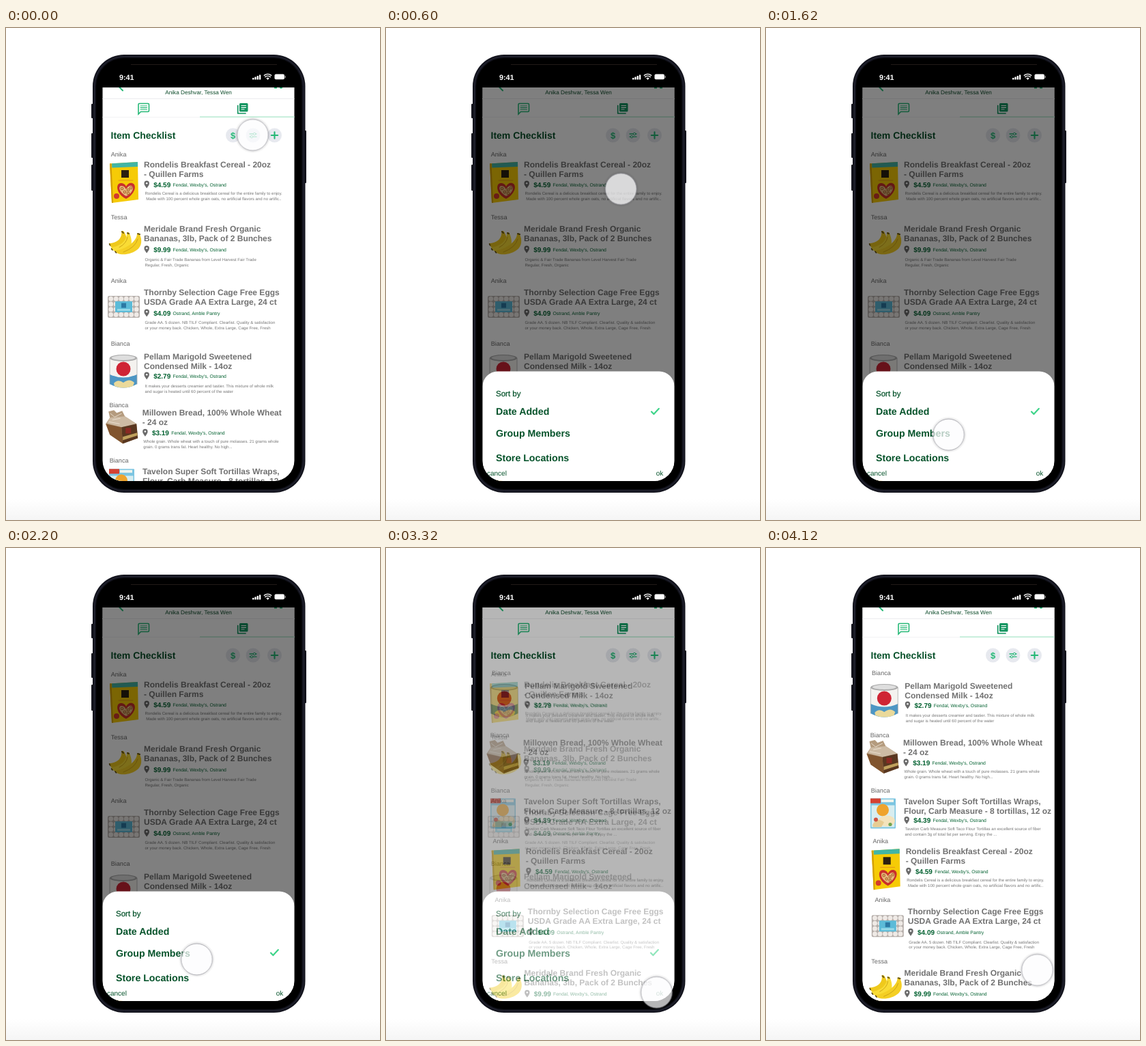
Animation, 548 px wide and 720 px high, one loop 4.14 s. Source, as an HTML page:

```html
<!DOCTYPE html>
<html lang="en">
<head>
<meta charset="utf-8">
<title>Item checklist sorting</title>
<style>
  html, body { margin: 0; width: 100%; height: 100%; overflow: hidden; background: #fff; }
  svg { display: block; width: 548px; height: 720px; }
  text { font-family: "Liberation Sans", Arial, sans-serif; text-rendering: geometricPrecision; white-space: pre; }
  .label { font-size: 9.1px; fill: #666; }
  .title { font-size: 12px; font-weight: 700; fill: #717171; }
  .price { font-size: 10px; font-weight: 700; fill: #00602f; }
  .shops { font-size: 6.85px; fill: #00602f; }
  .note { font-size: 6.05px; fill: #777; }
  .option { font-size: 14.2px; font-weight: 700; fill: #06532b; }
  .small { font-size: 10px; fill: #06532b; }
</style>
</head>
<body>
<svg id="stage" viewBox="0 0 548 720" xmlns="http://www.w3.org/2000/svg"></svg>
<script>
const LOOP = 4140;
const GREEN = '#25b876';

const rect = (x, y, w, h, fill, r = 0, more = '') =>
  `<rect x="${x}" y="${y}" width="${w}" height="${h}" rx="${r}" fill="${fill}" ${more}/>`;
const dot = (x, y, r, fill, more = '') => `<circle cx="${x}" cy="${y}" r="${r}" fill="${fill}" ${more}/>`;
const oval = (x, y, rx, ry, fill) => `<ellipse cx="${x}" cy="${y}" rx="${rx}" ry="${ry}" fill="${fill}"/>`;
const path = (d, fill, more = '') => `<path d="${d}" fill="${fill}" ${more}/>`;
const line = (d, color, width) =>
  path(d, 'none', `stroke="${color}" stroke-width="${width}" stroke-linecap="round" stroke-linejoin="round"`);
const text = (x, y, kind, words, more = '') =>
  `<text x="${x}" y="${y}" class="${kind}" ${more}>${words.replace(/&/g, '&amp;')}</text>`;
const group = (x, y, body) => `<g transform="translate(${x} ${y})">${body}</g>`;

// Pack pictures, drawn from their top left corner
const packs = {
  cereal: () =>
    path('M0 2.5 L41 0 L42 55 L3 60 Z', '#f6cb06') +
    path('M0 2.5 L2.5 2.3 L5 59.7 L3 60 Z', '#d39f00') +
    path('M3 2.3 L41 0 L41.1 7 L3.3 8.5 Z', '#42b5a5') +
    rect(17, 12, 11, 11, '#2a2010') +
    line('M13 27 H34', '#e5931b', 1) +
    path('M24 54 C8 46 9 31 16 31 C20 31 23 33 24 36 C26 32 29 30 33 31 C41 34 36 48 24 54 Z', '#c9302b') +
    path('M24 50 C12 43 13 35 17 35 C21 35 23 38 24 40 C26 36 29 34 32 35 C37 38 32 47 24 50 Z', '#e6b77d') +
    [[18, 39], [22, 44], [27, 41], [31, 38], [27, 46]].map(p =>
      dot(...p, 1.7, 'none', 'stroke="#a9682c" stroke-width="1.1"')).join('') +
    dot(10, 50, 4, '#d33a2c'),
  bananas: () =>
    path('M19 0 C21 11 12 18 1 18 C2 26 14 29 25 22 C29 17 27 6 22 0 Z', '#efc91c') +
    path('M27 2 C28 14 17 23 4 24 C7 33 22 33 32 23 C36 17 33 7 30 2 Z', '#f9dc35') +
    path('M42 4 C42 15 26 27 9 29 C12 36 32 37 44 26 C51 18 48 9 45 3 Z', '#f4cf24') +
    line('M28 9 Q27 18 16 24 M43 12 Q40 24 22 31', '#c99f16', .9) +
    line('M20 1 L22 3 M28 3 L30 4 M43 4 L46 5', '#6d5a16', 2) +
    line('M1.5 19 L2.5 21 M4.5 26 L6 28 M10 30 L11.5 32', '#55430f', 1.5),
  eggs: () => {
    let body = rect(0, 1, 47, 32, '#b5aeaa', 2);
    for (let i = 0; i < 24; i++)
      body += oval(4.7 + i % 6 * 7.5, 5.3 + (i / 6 | 0) * 7.7, 3.4, 3.5, '#efeae6');
    return body + rect(11, 9, 25, 16, '#5cbbd8') + rect(14, 20, 19, 3, '#97d9e8') + rect(20, 11.5, 7, 7, '#2c79a4');
  },
  milk: () =>
    path('M0 5 V43 Q20 54 40 43 V5 Z', '#f4f2ef') +
    path('M0 29 Q20 38 40 29 V43 Q20 54 0 43 Z', '#4d96c4') +
    path('M6 42 Q12 35 20 41 Q29 34 36 41 L34 46 Q20 51 7 46 Z', '#ead99a') +
    line('M0 5 V43 M40 5 V43', '#aaa', .8) +
    oval(20, 5, 20, 5, '#aaa') + oval(20, 4.6, 17.5, 3.5, '#dedede') +
    dot(20, 21, 10.5, '#cf2434'),
  bread: () =>
    path('M4 2 L12 0 L16 4 L24 1 L28 9 L45 20 L47 41 L25 49 L6 36 L0 20 L6 11 Z', '#b49b7e') +
    path('M6 11 L28 9 L45 20 L23 25 L2 19 Z', '#cdbba4') +
    path('M0 20 L23 25 L25 49 L6 36 Z', '#81552f') +
    path('M23 25 L45 20 L47 41 L25 49 Z', '#593720') +
    path('M25 39 L46 33 L46.5 37 L25 44 Z', '#c0a15d') +
    rect(29, 26, 8, 8, '#8a2a23') +
    line('M7 5 L13 10 L23 5 M10 14 L21 12 M5 17 L20 20', '#eee3d3', .9),
  wraps: () =>
    rect(0, 0, 37, 44, '#7cc5e1', 1) + rect(1.5, 10, 34, 32, '#d8edf0') +
    rect(0, 0, 15, 7, '#d44132') + rect(16, 1.5, 18, 4, '#f0f4ed') +
    dot(18, 17, 9, '#efa32c') +
    oval(24, 33, 12, 8, '#f3e3bc') +
    path('M3 39 Q9 26 20 35 L16 42 H4 Z', '#e7cd93') +
    dot(8, 31, 3, '#cf5342') + dot(29, 38, 2.6, '#71a34f')
};

const FULL = "Fendal, Wexby's, Ostrand";
// up: label rise, pic: picture offset, drop: price below title, low: note below title
const goods = {
  cereal: { who: 'Anika', up: 15, pic: [-50, -8], drop: 29, low: 42,
    title: ['Rondelis Breakfast Cereal - 20oz', '- Quillen Farms'], price: '$4.59', shops: FULL,
    note: ['Rondelis Cereal is a delicious breakfast cereal for the entire family to enjoy.',
      ' Made with 100 percent whole grain oats, no artificial flavors and no artific..'] },
  bananas: { who: 'Tessa', up: 17.5, pic: [-52, -1], drop: 30, low: 45,
    title: ['Meridale Brand Fresh Organic', 'Bananas, 3lb, Pack of 2 Bunches'], price: '$9.99', shops: FULL,
    note: ['Organic & Fair Trade Bananas from Level Harvest Fair Trade', 'Regular, Fresh, Organic'] },
  eggs: { who: 'Anika', up: 17.2, pic: [-53, 0], drop: 30, low: 44.5,
    title: ['Thornby Selection Cage Free Eggs', 'USDA Grade AA Extra Large, 24 ct'], price: '$4.09', shops: 'Ostrand, Amble Pantry',
    note: ['Grade AA. 5 dozen. NB TILF Compliant. Clearlist. Quality & satisfaction',
      'or your money back. Chicken, Whole, Extra Large, Cage Free, Fresh'] },
  milk: { who: 'Bianca', up: 18.8, pic: [-50, -7], drop: 28, low: 43,
    title: ['Pellam Marigold Sweetened', 'Condensed Milk - 14oz'], price: '$2.79', shops: FULL,
    note: ['It makes your desserts creamier and tastier. This mixture of whole milk',
      'and sugar is heated until 60 percent of the water'] },
  bread: { who: 'Bianca', up: 11.5, pic: [-53.5, -8], drop: 29, low: 42,
    title: ['Millowen Bread, 100% Whole Wheat', '- 24 oz'], price: '$3.19', shops: FULL,
    note: ['Whole grain. Whole wheat with a touch of pure molasses. 21 grams whole',
      'grain. 0 grams trans fat. Heart healthy. No high...'] },
  wraps: { who: 'Bianca', up: 16, pic: [-49, -8], drop: 28, low: 41,
    title: ['Tavelon Super Soft Tortillas Wraps,', 'Flour, Carb Measure - 8 tortillas, 12 oz'], price: '$4.39', shops: FULL,
    note: ['Tavelon Carb Measure Soft Taco Flour Tortillas an excellent source of fiber',
      'and contain 3g of total fat per serving. Enjoy the ...'] }
};

const pin = y =>
  path('M4.2 7.2 C1 2.8 .5 1.8 .5 0 A3.7 3.7 0 0 1 7.9 0 C7.9 1.8 7.4 2.8 4.2 7.2 Z', '#6a6a6a', `transform="translate(0 ${y})"`) +
  dot(4.2, y, 1.3, '#fff');

function item(name, x, y) {
  const g = goods[name];
  return group(x, y,
    text(-48.3, -g.up - 1, 'label', g.who) +
    group(...g.pic, packs[name]()) +
    text(0, 0, 'title', g.title[0]) + text(0, 14, 'title', g.title[1]) +
    pin(g.drop - 5.8) +
    text(14.2, g.drop - .5, 'price', g.price) + text(42.5, g.drop - 1.4, 'shops', g.shops) +
    text(1.5, g.low - 2.2, 'note', g.note[0]) + text(1.5, g.low + 5.5, 'note', g.note[1]));
}

const header = () =>
  rect(141, 87, 282, 577, '#fff') +
  line('M171 91.5 L165.5 86', GREEN, 2) +
  rect(393, 86, 4, 2.5, GREEN) + rect(401, 86, 4, 2.5, GREEN) +
  text(282, 97, '', 'Anika Deshvar, Tessa Wen', 'font-size="8.2" fill="#0b4a28" text-anchor="middle"') +
  rect(141, 103, 282, 1, '#ececef') + rect(141, 130, 143, 1, '#f3f3f5') + rect(284, 129.3, 139, 1.7, '#bfecd6') +
  path('M195.5 110.5 H208 Q209.5 110.5 209.5 112 V121 Q209.5 122.5 208 122.5 H197.5 L194 126 V112 Q194 110.5 195.5 110.5 Z',
    'none', `stroke="${GREEN}" stroke-width="1.6"`) +
  line('M197 114 H206.5 M197 116.6 H206.5 M197 119.2 H206.5', GREEN, 1.1) +
  line('M339.7 113.5 V125 H351', '#139560', 1.7) +
  rect(342, 110, 12.5, 12.5, '#139560', 1.5) +
  line('M345 113.5 H351.5 M345 116.3 H351.5 M345 119 H349', '#fff', 1.2) +
  text(153.5, 162, '', 'Item Checklist', 'font-size="14" font-weight="700" fill="#07512a"') +
  [332.5, 362, 393.5].map(x => dot(x, 157, 10.5, '#e7e9ef')).join('') +
  text(332.5, 161.6, '', '$', `font-size="13" font-weight="700" fill="${GREEN}" text-anchor="middle"`) +
  line('M357 155 H367 M357 159.2 H367', GREEN, 1.3) +
  dot(364, 155, 1.7, '#e7e9ef', `stroke="${GREEN}"`) + dot(360, 159.2, 1.7, '#e7e9ef', `stroke="${GREEN}"`) +
  line('M388.8 157 H398.2 M393.5 152.3 V161.7', GREEN, 2.1);

const tick = (id, x, y) => `<g id="${id}">${line(`M${x - 5} ${y} l3.4 3.6 l7.4 -8`, '#3fd48a', 2.2)}</g>`;

const sheet = () =>
  rect(141, 87, 282, 577, '#000', 0, 'opacity=".5"') +
  rect(141.5, 502.5, 281, 161, '#fff', 22) +
  text(161, 538.7, '', 'Sort by', 'font-size="11.5" fill="#06532b" stroke="#06532b" stroke-width=".25"') +
  text(161, 566.2, 'option', 'Date Added') +
  text(161, 598, 'option', 'Group Members') +
  text(161, 633.8, 'option', 'Store Locations') +
  text(148, 654.6, 'small', 'cancel') + text(395.7, 654.6, 'small', 'ok') +
  tick('tickDate', 394, 561.5) + tick('tickGroup', 393, 592.5);

const phone = () =>
  rect(125, 111, 4, 21, '#14151d', 1) + rect(125, 154, 4, 36, '#14151d', 1) +
  rect(125, 200, 4, 38, '#14151d', 1) + rect(436, 150, 4, 77, '#14151d', 1) +
  rect(127, 39, 311.5, 641, '#12131c', 46) +
  rect(129.5, 41.5, 306.5, 636, 'none', 44, 'stroke="#2b2c3a" stroke-width=".9"') +
  rect(132, 44, 301.5, 631, '#000', 41) +
  rect(183, 53, 214, .8, '#2b211f');

const status = () =>
  text(166, 76, '', '9:41', 'font-size="10.8" font-weight="700" fill="#fff"') +
  [0, 1, 2, 3].map(i => rect(361 + i * 3.3, 73 - i * 1.5, 2.4, 2.5 + i * 1.5, '#fff', .5)).join('') +
  path('M383.5 76 L381.3 73.4 Q383.5 71.7 385.7 73.4 Z', '#fff') +
  line('M379.7 71.6 Q383.5 68.6 387.3 71.6 M378.3 69.4 Q383.5 65.3 388.7 69.4', '#fff', 1.4) +
  rect(393.5, 67.5, 14.5, 7.8, '#fff', 2) + rect(408.7, 70, 1.2, 3, '#aaa', .5);

const listByDate = [['cereal', 202, 204], ['bananas', 202, 298], ['eggs', 202, 391],
  ['milk', 202, 485], ['bread', 199.7, 567.3], ['wraps', 200, 653.3]];
const listByMember = [['milk', 203.3, 206], ['bread', 201, 289], ['wraps', 202, 374.5],
  ['cereal', 204.7, 448.3], ['eggs', 207.8, 536.3], ['bananas', 202.6, 626.3]];
const page = rows => header() + rows.map(r => item(...r)).join('');

document.getElementById('stage').innerHTML = `
  <defs>
    <linearGradient id="floor" x2="0" y2="1"><stop offset="0" stop-color="#fff"/><stop offset="1" stop-color="#f5f5f5"/></linearGradient>
    <clipPath id="screen"><path d="M141.5 87 H422.5 V633 A30 30 0 0 1 392.5 663 H171.5 A30 30 0 0 1 141.5 633 Z"/></clipPath>
  </defs>
  ${rect(0, 0, 548, 720, '#fff')}${rect(0, 690, 548, 30, 'url(#floor)')}
  ${phone()}
  <g clip-path="url(#screen)">
    <g>${page(listByDate)}</g>
    <g id="sheet">${sheet()}</g>
    <g id="sorted">${page(listByMember)}</g>
  </g>
  ${status()}
  <g id="touch">
    ${dot(0, 0, 24.6, 'none', 'stroke="#000" stroke-width="2.6" opacity=".05"')}
    ${dot(0, 0, 23, '#fdfdfe', 'fill-opacity=".72" stroke="#62626c" stroke-opacity=".65" stroke-width=".9"')}
  </g>`;

// Each step: [time, value, easing towards the next step]
function play(id, prop, steps) {
  document.getElementById(id).animate(
    steps.map(([t, value, easing = 'linear']) => ({ offset: t / LOOP, [prop]: value, easing })),
    { duration: LOOP, iterations: Infinity });
}
const fade = (id, start, from, to) => play(id, 'opacity',
  [[0, from], [start, from, 'ease-out'], [start + 300, to], [LOOP, to]]);

fade('sheet', 150, 0, 1);
fade('tickDate', 1780, 1, 0);
fade('tickGroup', 1780, 0, 1);
fade('sorted', 3235, 0, 1);

const at = (x, y) => `translate(${x}px, ${y}px)`;
play('touch', 'transform', [
  [0, at(361.5, 156.5)],
  [420, at(361.5, 156.5), 'ease-in-out'],
  [1000, at(276.5, 546)],
  [1060, at(276.5, 546.5), 'ease-in-out'],
  [1480, at(267.5, 595)],
  [2050, at(267.5, 595.5), 'ease-in-out'],
  [2720, at(382, 656), 'ease-in-out'],
  [3200, at(396.5, 650.5)],
  [3480, at(396.5, 650), 'ease-in-out'],
  [4020, at(397.5, 617.5)],
  [LOOP, at(397.5, 617.5)]
]);
</script>
</body>
</html>
```
